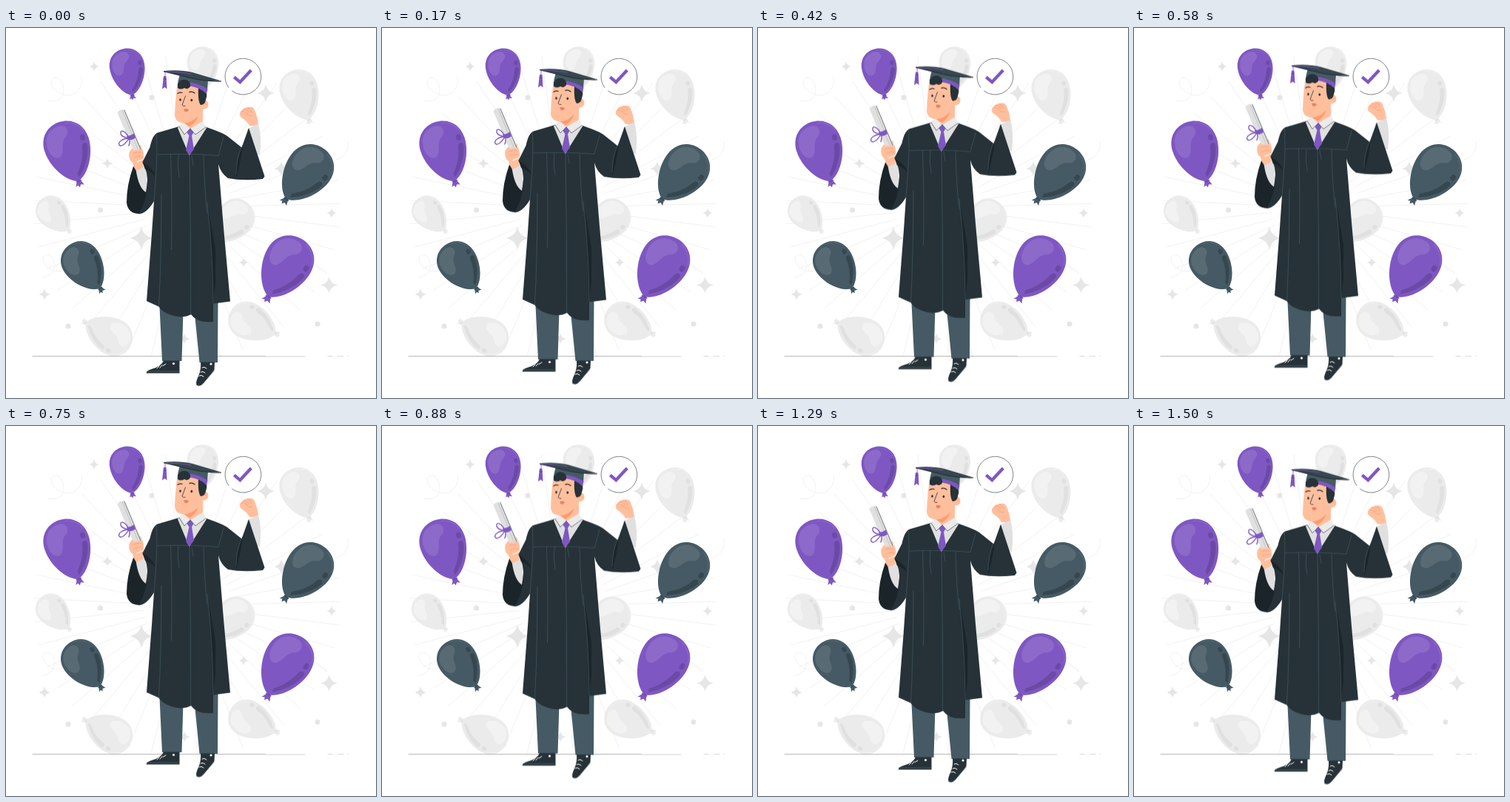
An HTML page for the animation above (1540 ms loop, 500x500 px).

```html
<!DOCTYPE html>
<html lang="en">
<head>
<meta charset="utf-8">
<title>Graduate</title>
<style>
  html, body { margin: 0; width: 100%; height: 100%; overflow: hidden; background: #fff; }
  svg { display: block; width: 100vw; height: 100vh; }
  .gray   { --fill: #ebebeb; --hi: #f2f2f2; --lo: #e0e0e0; }
  .purple { --fill: #7e57c2; --hi: #8d69c9; --lo: #6b4aa5; }
  .slate  { --fill: #455a64; --hi: #586b74; --lo: #37474f; }
  .line { fill: none; stroke-linecap: round; stroke-linejoin: round; }
  .gown { fill: #263238; }
  .seam { stroke: #455a64; stroke-width: .7; }
  .skin { fill: #ffbf9d; }
  .crease { stroke: #ff9a6c; stroke-width: .8; }
  .shirt { fill: #e0e0e0; }
  .ink { stroke: #263238; }
  .violet { fill: #7e57c2; }

  /* the figure bobs in even steps, 37 per loop */
  #man { animation: bob 1540ms -6ms infinite; }
  @keyframes bob {
    0%     { transform: translateY(0); animation-timing-function: steps(18); }
    48.64% { transform: translateY(-9.72px); animation-timing-function: step-end; }
    48.65% { transform: translateY(-9.18px); animation-timing-function: steps(19); }
    100%   { transform: translateY(1.08px); }
  }
</style>
</head>
<body>
<svg viewBox="0 0 500 500">
  <defs>
    <g id="balloon">
      <path d="M-2 -2L-7 8L-3 6L-1 10L2 6L7 8L3 -2Z" fill="var(--fill)"/>
      <path d="M0 0C-18 -5 -37 -35 -37 -62C-37 -86 -20 -100 0 -100S37 -86 37 -62C37 -35 18 -5 0 0Z" fill="var(--fill)"/>
      <path d="M-31 -65C-31 -84 -19 -94 -4 -94C10 -94 12 -80 2 -74C-8 -68 -6 -56 -12 -49C-20 -40 -31 -50 -31 -65Z" fill="var(--hi)"/>
      <path d="M3 -6C16 -16 29 -34 32 -52C31 -57 25 -57 23 -52C20 -37 13 -24 2 -12Z" fill="var(--lo)"/>
      <ellipse cx="28" cy="-65" rx="4" ry="5" fill="var(--lo)"/>
      <path d="M8 -96C20 -94 30 -85 33 -74" fill="none" stroke="var(--hi)" stroke-width="1.2"/>
      <path d="M-4 0L5 0" stroke="var(--lo)" stroke-width="1.6"/>
    </g>
    <path id="star" d="M0 -10Q1.5 -1.5 10 0Q1.5 1.5 0 10Q-1.5 1.5 -10 0Q-1.5 -1.5 0 -10Z" fill="#e6e6e6"/>
  </defs>

  <rect width="500" height="500" fill="#fff"/>
  <path id="rays" class="line" stroke="#f0f0f0" stroke-width=".9"/>
  <g class="line" stroke="#f2f2f2">
    <path d="M102 67C105 84 89 96 74 89C62 84 56 69 66 67C77 66 83 89 72 96C68 99 62 99 57 98"/>
    <path d="M76 328C64 332 51 322 50 312C50 305 58 304 63 311C70 322 63 337 48 337"/>
    <path d="M462 153C463 166 457 175 446 178"/>
    <path d="M408 316C418 318 427 324 433 332"/>
  </g>

  <g class="gray">
    <use href="#balloon" transform="translate(269 82) rotate(-5) scale(.57)"/>
    <use href="#balloon" transform="translate(409 124) rotate(-18) scale(.7)"/>
    <use href="#balloon" transform="translate(84.500 273.500) rotate(-42) scale(.56)"/>
    <use href="#balloon" transform="translate(280 287) rotate(45) scale(.69)"/>
    <use href="#balloon" transform="translate(108 398) rotate(118) scale(.68)"/>
    <use href="#balloon" transform="translate(364.500 413) rotate(-65) scale(.68)"/>
  </g>

  <use href="#star" transform="translate(119 52) scale(.7)"/>
  <use href="#star" transform="translate(351 88) scale(1.2)"/>
  <use href="#star" transform="translate(137 183) scale(.75)"/>
  <use href="#star" transform="translate(183 284) scale(1.6)"/>
  <use href="#star" transform="translate(372 190)"/>
  <use href="#star" transform="translate(440 250) scale(.7)"/>
  <use href="#star" transform="translate(321 317) scale(.65)"/>
  <use href="#star" transform="translate(436.500 347.500) scale(1.15)"/>
  <use href="#star" transform="translate(52 360) scale(.8)"/>
  <use href="#star" transform="translate(241 420) scale(.75)"/>
  <g fill="#e6e6e6">
    <circle cx="197" cy="94" r="3.500"/><circle cx="127.500" cy="246" r="3.500"/>
    <circle cx="84" cy="403" r="3.500"/><circle cx="421" cy="400" r="3.500"/>
  </g>

  <g class="purple">
    <use href="#balloon" transform="translate(170.500 91) rotate(-10) scale(.64)"/>
    <use href="#balloon" transform="translate(98 207) rotate(-18) scale(.84)"/>
    <use href="#balloon" transform="translate(354.500 363) rotate(30) scale(.9)"/>
  </g>
  <g class="slate">
    <use href="#balloon" transform="translate(378.500 231) rotate(38) scale(.85)"/>
    <use href="#balloon" transform="translate(127 352) rotate(-35) scale(.72)"/>
  </g>

  <path class="line" d="M36 443.500H350" stroke="#a8a8a8" stroke-width=".8"/>
  <path class="line" d="M350 444H404" stroke="#c4c4c4" stroke-width=".8"/>
  <path class="line" d="M435 443.500H441M448 443.500H456M462 443.500H463" stroke="#d2d2d2" stroke-width=".8"/>

  <path d="M303 83L300 88L309 87A24.500 24.500 0 1 0 303 83Z" fill="#fff"/>
  <path class="line ink" d="M305.500 85A24.400 24.400 0 1 0 301 80.500" stroke-width=".6"/>
  <path d="M308.300 66.300L316.300 73L331.300 57" fill="none" stroke="#7e57c2" stroke-width="4.200"/>

  <g id="man">
    <!-- legs and shoes -->
    <path d="M207 366L211 450H237.500L240 366ZM253 366L261.500 452H286L286.500 366Z" fill="#455a64"/>
    <path class="gown" d="M213 449.500H234.500V466.500H189.500Q190 462.500 198 460.500Q210 457 213 449.500Z"/>
    <path d="M190 464H234.500" stroke="#50636c" stroke-width=".7"/>
    <path class="gown" d="M263 451.500H282L281.500 462L267 480Q262 485.500 257.500 482.500Q256 478.500 260 470.500Q264 461.500 263 451.500Z"/>
    <path class="line" d="M281 463.500L266 480.500Q262 484.500 258 482.500" stroke="#50636c" stroke-width=".7"/>
    <path class="line" d="M204 460L207 457M208 459L211 455.500M212 456.500L216 454M265 459Q268 457 271 460M263 465Q266 463 269 466M261 470Q264 468 267 471" stroke="#fff" stroke-width="1"/>
    <circle cx="226.500" cy="453.500" r="1.600" fill="#fff"/><circle cx="277" cy="454" r="1.600" fill="#fff"/>

    <!-- arm with the scroll -->
    <path d="M172 187Q163 212 163 236Q165 252 182 251L196 232L186 190Z" fill="#1b2429"/>
    <path class="shirt" d="M175.500 191L187 186Q193 205 189 222Q179 216 175.500 191Z"/>
    <path class="skin" d="M166.500 168Q171 160 178 158.500Q183 157 183 161L186 178Q186 185 185 189L176 193Q172 188 171 182Q165 178 166.500 168Z"/>
    <path d="M150.500 114.500Q154 109.500 160 110.500L183 164Q179 168 173 167.500Z" fill="#e0e0e0"/>
    <path class="line" d="M157.500 112L179 166" stroke="#bdbdbd" stroke-width=".8"/>
    <path class="line ink" d="M160 111L182 164" stroke-width=".6"/>
    <path class="skin" d="M168 169Q173 163 178 165.500L184 163Q187 170 186 178L174 181Q167 177 168 169Z"/>
    <path class="line crease" d="M172 169Q178 167 182 168M173 175Q179 172 184 173"/>
    <path class="line" d="M177 181L186 177" stroke="#fff" stroke-width="1.200"/>
    <path class="line" d="M166 149C162 139 154 136 155 143C156 147 161 148 166 149C158 149 151 154 153 158C156 162 163 155 166 149M166 149Q168 154 166 159" stroke="#7e57c2" stroke-width="1.400"/>
    <path class="violet" d="M163 146Q168 146 173 142.500L175 148.500Q170 152 165 151Z"/>

    <!-- raised fist -->
    <path class="shirt" d="M326 137L341 128.500Q346 148 343 172L332 170Z"/>
    <path class="skin" d="M329 132Q325 125 318 121Q314 117 317 113Q321 107 328 107Q334 106 336 111Q340 120 341 129.500Q335 133 329 132Z"/>
    <path class="line crease" d="M318 113Q322 112 325 115M321 110Q326 110 328 114M326 108Q331 109 332 114M325 115Q329 121 333 118"/>

    <!-- gown -->
    <path class="gown" d="M234 133L205 141.500Q198 144 194.500 161L184.500 181Q192 195 191 212Q190 234 179 251.500Q190 251 200 234L197 278L190 369L206.500 376.500Q214 388 236 390.500Q245 390 250 387Q258 399 280 397V372.500L303 369.500L294 270L287 184Q290 196 300 203Q320 207 347 204L349.500 200.500L328 135L318.500 161.500L299 146Q294 142 268 133L248 172Z"/>
    <path d="M272 236L283 300V345L280 372.500V396Q279 300 272 236ZM320 158Q310 180 311 203Q318 178 320 158ZM184.500 181Q199 190 202 200Q194 192 188 191Z" fill="#1b2429"/>
    <path class="line seam" d="M203.500 143L204 171Q247 169 287 172.500L294 147M222.500 171Q225 240 223.500 299M233 171Q231 186 234 201M248 172Q250 280 249.500 387M210 225Q210 310 206.500 376M267 172Q268 220 272 250M272 236Q280 310 280 372M251 173L253 185M204 171Q203 200 200 234M318 161Q311 178 311 197"/>

    <!-- collar and tie -->
    <path class="shirt" d="M236 130L232 135L247.500 172L271 135L266 126L250 140Z"/>
    <path class="skin" d="M239 118V131Q245 138 249 137Q259 134 266 126V100Z"/>
    <path d="M240 128Q252 128 260 118Q257 128 248 133Z" fill="#ff9a6c"/>
    <path class="violet" d="M249 135L253.500 141L251 145.500L254 164L247.500 172L243 165L247.500 145.500L244.500 141Z"/>
    <path d="M239 127L234 133L241 144L249 136ZM266 126L249 136L256 144L271 135Z" fill="#ebebeb"/>
    <path class="line ink" d="M234 133L241 144L249 136L256 144L270 134" stroke-width=".6"/>

    <!-- head -->
    <path class="skin" d="M232 74Q229 92 228 118Q229 128 241 128.500Q256 127 265 110Q274 110 273.500 102Q272 96 267 99L268 76Z"/>
    <path class="line crease" d="M267 103Q270 100 271 104"/>
    <path class="gown" d="M260 80L271 86Q272 92 270 97Q269 104 263 104Q259 99 260 80Z"/>
    <path class="line ink" d="M232 88.500Q235 86.500 238 87.500M248 86.500Q252 85.500 255 88" stroke-width="1.300"/>
    <ellipse class="gown" cx="235.500" cy="97" rx="1.300" ry="1.700"/>
    <ellipse class="gown" cx="250.800" cy="97.500" rx="1.400" ry="1.800"/>
    <path class="line ink" d="M242.500 92L238 104Q239 106 242 105.500" stroke-width=".8"/>
    <path d="M240 110.500Q241 108 243.500 109Q246.500 108.500 247 110.500Q246 114 243 113.500Q241 113.500 240 110.500Z" fill="#f28f6b"/>
    <path class="line" d="M242 111H245" stroke="#c9573c" stroke-width=".7"/>

    <!-- cap -->
    <path d="M235 62L232 74Q238 70 246 74Q262 75 272 84L273 70Z" fill="#455a64"/>
    <path class="violet" d="M246 73.500Q262 75 272.500 82.500L271 89Q262 80 246 78Z"/>
    <path class="gown" d="M232 75Q236 69 243 70Q250 72 249 79Q246 84 241 81Q236 84 232 81Z"/>
    <path d="M213 58Q235 56 252 60L291 71.500Q270 72 250 67.500L213 59Z" fill="#37474f"/>
    <path class="line ink" d="M213.500 58.700L250 67.700Q271 72.500 290.500 72" stroke-width="1.200"/>
    <path class="line" d="M250 62Q230 58 215 60V66" stroke="#7e57c2" stroke-width=".8"/>
    <path class="violet" d="M213 65H216.500L217.500 82.500L214.500 80L211 82.500Z"/>
    <path class="line" d="M213 69H216.500" stroke="#5b3b94" stroke-width=".9"/>
  </g>
</svg>
<script>
  // faint burst behind the figure
  const count = 41;
  let d = "";
  for (let i = 0; i < count; i++) {
    const a = i / count * 2 * Math.PI - .028;
    const at = r => (245 + r * Math.cos(a)).toFixed(1) + " " + (243 + r * Math.sin(a)).toFixed(1);
    d += "M" + at(60) + "L" + at(207);
  }
  document.getElementById("rays").setAttribute("d", d);
</script>
</body>
</html>
```
